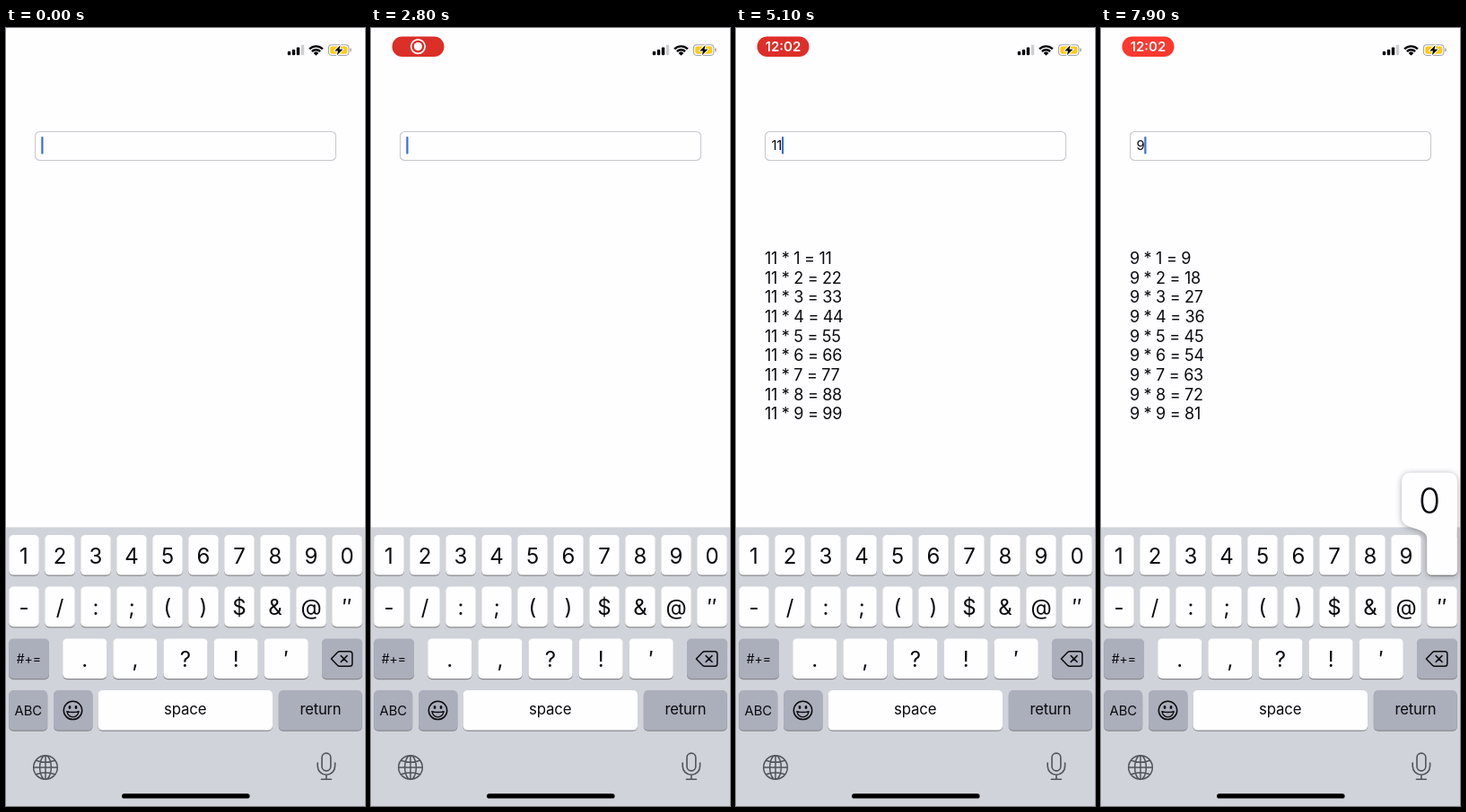
Write an HTML page with a canvas that moves like this. It is 400 by 867 pixels and loops after 8 s.

```html
<!DOCTYPE html>
<html lang="en">
<head>
<meta charset="utf-8">
<title>Times table keyboard</title>
<style>
html, body { margin: 0; width: 100%; height: 100%; overflow: hidden; background: #fefdff; }
canvas { display: block; }
</style>
</head>
<body>
<canvas id="stage" width="400" height="867"></canvas>
<script>
const ctx = document.getElementById('stage').getContext('2d');
const LOOP = 8000, STEP = 100;
const WHITE = '#fefdff', INK = '#0b0b0d', DARK_KEY = '#abaebb', GREY = '#50545b';
const ROWS = [565, 622.6, 680.4, 738];
const KEY_H = 44.6, KEY_W = 33.6;

// [start, end, key]
const presses = [
  [500, 700, '$'], [1100, 1300, '.'], [1500, 1700, ','],
  [2000, 2200, '?'], [2400, 2600, '!'],
  [3500, 3700, 'c'], [3900, 4100, 'v'],
  [4600, 4800, '1'], [4900, 5000, '1'],
  [5900, 6000, 'del'], [6500, 6600, 'del'],
  [7000, 7200, '9'], [7800, 8000, '0']
];
// [time, field value]
const edits = [[0, ''], [4700, '1'], [5000, '11'], [6000, '1'], [6600, ''], [7200, '9']];
const LETTERS_FROM = 3100, LETTERS_TO = 4300, CLOCK_FROM = 3000;

const clamp = (v, lo, hi) => Math.min(hi, Math.max(lo, v));
const rowOf = (chars, row, x, pitch, w) =>
  [...chars].map((c, i) => ({ c, x: x + i * pitch, y: ROWS[row], w }));

const numberKeys = [
  ...rowOf('1234567890', 0, 3.2, 40, KEY_W),
  ...rowOf('-/:;()$&@″', 1, 3.2, 40, KEY_W),
  ...rowOf('.,?!′', 2, 63.2, 56.1, 49.2)
];
const letterKeys = [
  ...rowOf('qwertyuiop', 0, 3.2, 40, KEY_W),
  ...rowOf('asdfghjkl', 1, 23.1, 40, KEY_W),
  ...rowOf('zxcvbnm', 2, 63.2, 40, KEY_W)
];

function text(s, x, y, size, { align = 'center', weight = 400, color = INK, gap = 0 } = {}) {
  ctx.font = `${weight} ${size}px Inter, Roboto, sans-serif`;
  ctx.textAlign = align;
  ctx.letterSpacing = gap + 'px';
  ctx.fillStyle = color;
  ctx.fillText(s, x, y);
}

function box(x, y, w, h, r, color) {
  ctx.fillStyle = color;
  ctx.beginPath();
  ctx.roundRect(x, y, w, h, r);
  ctx.fill();
}

function stroke(d, color = INK, width = 1.6) {
  ctx.strokeStyle = color;
  ctx.lineWidth = width;
  ctx.lineJoin = ctx.lineCap = 'round';
  ctx.stroke(new Path2D(d));
}

function fill(d, color = INK) {
  ctx.fillStyle = color;
  ctx.fill(new Path2D(d));
}

const circle = (x, y, rx, ry = rx) =>
  `M${x - rx} ${y}a${rx} ${ry} 0 1 0 ${2 * rx} 0a${rx} ${ry} 0 1 0 ${-2 * rx} 0Z`;

function keycap(x, y, w, color = WHITE) {
  box(x, y + 1.2, w, KEY_H, 5, '#898a8f');
  box(x, y, w, KEY_H, 5, color);
}

function statusBar(t) {
  ctx.globalAlpha = clamp(t / 300, 0, 1);
  const glow = (1 - Math.cos((t - 2850) / 2100 * 2 * Math.PI)) / 2;
  const mix = (a, b) => Math.round(a + (b - a) * glow);
  box(23.5, 9.5, 58, 22.6, 11.3, `rgb(${mix(219, 255)},${mix(47, 57)},${mix(40, 48)})`);
  if (t < CLOCK_FROM) {
    stroke(circle(52.4, 20.6, 7.8), '#fff', 1.7);
    fill(circle(52.4, 20.6, 4.6), '#fff');
  } else {
    text('12:02', 52.5, 26.2, 15, { weight: 600, color: '#fff' });
  }
  ctx.globalAlpha = 1;

  [4.2, 6.2, 8.7, 11.4].forEach((h, i) =>
    box(313.8 + i * 5, 30.2 - h, 3.4, h, 1, i < 3 ? '#000' : '#cfced1'));

  ctx.strokeStyle = ctx.fillStyle = '#000';
  ctx.lineCap = 'butt';
  ctx.lineWidth = 2.4;
  for (const r of [10.4, 6.5]) {
    ctx.beginPath();
    ctx.arc(345.5, 30.8, r, -Math.PI * .75, -Math.PI * .25);
    ctx.stroke();
  }
  ctx.beginPath();
  ctx.moveTo(345.5, 30.8);
  ctx.arc(345.5, 30.8, 4, -Math.PI * .75, -Math.PI * .25);
  ctx.fill();

  box(359, 18.3, 23.4, 12.6, 3.8, '#a5a4a8');
  box(360, 19.3, 21.4, 10.6, 3, WHITE);
  box(361.2, 20.4, 19, 8.4, 2, '#fccb14');
  box(383.2, 22.6, 1.5, 4, 1, '#a5a4a8');
  const bolt = 'M372.6 19.2L366.2 25.4H370L368.8 30.2L375.4 23.8H371.4Z';
  stroke(bolt, WHITE, 2);
  fill(bolt, '#000');
}

function field(t, value, since) {
  box(32, 115, 336, 33, 5.5, '#c9c8cb');
  box(33.1, 116.1, 333.8, 30.8, 4.5, WHITE);
  text(value, 39.5, 136.2, 14.8, { align: 'left', gap: -.2 });
  const phase = t % 1000;
  const blinkOff = t - since > 600 && phase > 220 && phase < 580;
  if (!blinkOff) box(39.3 + ctx.measureText(value).width, 121, 2.2, 19.5, 1, '#3a6fd6');
}

function table(value) {
  if (!value) return;
  for (let n = 1; n < 10; n++) {
    text(`${value} * ${n} = ${value * n}`, 32, 241.5 + n * 21.65, 18, { align: 'left', gap: -.3 });
  }
}

function popup({ c, x, y, w }) {
  const W = w + 28.4, top = y - 69.5, r = 11;
  const left = clamp(x - 14.2, 2.8, 397 - W), right = left + W;
  const bulge = y - 19, neck = y + 4, bottom = y + KEY_H;
  ctx.save();
  ctx.shadowColor = 'rgba(0,0,0,.32)';
  ctx.shadowBlur = 7;
  ctx.shadowOffsetY = 1;
  fill(`M${left + r} ${top}H${right - r}Q${right} ${top} ${right} ${top + r}V${bulge}
    C${right} ${bulge + 14} ${x + w} ${neck - 14} ${x + w} ${neck}
    V${bottom - 5}q0 5 -5 5H${x + 5}q-5 0 -5 -5V${neck}
    C${x} ${neck - 14} ${left} ${bulge + 14} ${left} ${bulge}V${top + r}
    Q${left} ${top} ${left + r} ${top}Z`, WHITE);
  ctx.restore();
  text(c, left + W / 2, y - 24.5, 39, { weight: 300 });
}

function icons(letters, deleting) {
  keycap(3.2, ROWS[2], 44.8, DARK_KEY);
  if (letters) stroke('M25.6 693.4L35.6 703.6H30.8V711.6H20.4V703.6H15.6Z', INK, 1.4);
  else text('#+=', 25.4, 708, 14);

  keycap(352, ROWS[2], 45, deleting ? WHITE : DARK_KEY);
  stroke('M362.4 703L369.4 695.8Q370.4 694.8 372 694.8H383Q385.8 694.8 385.8 697.6V708.4Q385.8 711.2 383 711.2H372Q370.4 711.2 369.4 710.2Z', INK, 1.5);
  stroke('M373.2 699.6l6.8 6.8m0-6.8l-6.8 6.8', INK, 1.5);

  keycap(3.2, ROWS[3], 43, DARK_KEY);
  text(letters ? '123' : 'ABC', 24.8, 766, letters ? 15.6 : 14.8);

  keycap(53, ROWS[3], 43.4, DARK_KEY);
  stroke(circle(74.5, 760.4, 10.2), INK, 1.5);
  fill(circle(71, 757, 1.4, 2));
  fill(circle(78, 757, 1.4, 2));
  stroke('M67.8 761.6Q74.5 763.4 81.2 761.6Q79.6 767.8 74.5 767.8Q69.4 767.8 67.8 761.6Z', INK, 1.3);

  keycap(102.6, ROWS[3], 194.4);
  text('space', 199.7, 765, 16.8, { gap: -.1 });
  keycap(303.8, ROWS[3], 93, DARK_KEY);
  text('return', 350.4, 765, 16.6, { gap: -.2 });

  stroke(circle(44, 824, 13.3) + circle(44, 824, 6.4, 13.3) +
    'M44 810.7V837.3M30.7 824H57.3M33.6 816.2Q44 820.4 54.4 816.2M33.6 831.8Q44 827.6 54.4 831.8', GREY, 1.5);
  stroke('M352 813a4.9 4.9 0 0 1 9.8 0V823a4.9 4.9 0 0 1 -9.8 0Z' +
    'M347.2 819V822.5a9.7 9.7 0 0 0 19.4 0V819M356.9 832.2V837.2M351.4 837.2H362.4', GREY, 1.6);
  box(129, 853.2, 142.6, 5.4, 2.7, '#000');
}

function keyboard(t) {
  const letters = t >= LETTERS_FROM && t < LETTERS_TO;
  const keys = letters ? letterKeys : numberKeys;
  const pressed = presses.find(([from, to]) => t >= from && t < to)?.[2];
  ctx.fillStyle = '#d1d3da';
  ctx.fillRect(0, 556.4, 400, 311);
  for (const { c, x, y, w } of keys) {
    keycap(x, y, w);
    text(c, x + w / 2, y + (letters ? 29.2 : 31.6), letters ? 25.4 : 24);
  }
  icons(letters, pressed === 'del');
  const key = keys.find(k => k.c === pressed);
  if (key) popup(key);
}

function draw(now) {
  const t = Math.floor(now % LOOP / STEP) * STEP;
  const [since, value] = edits.findLast(([at]) => at <= t);
  ctx.fillStyle = WHITE;
  ctx.fillRect(0, 0, 400, 867);
  statusBar(t);
  field(t, value, since);
  table(value);
  keyboard(t);
}

let start;
function tick(now) {
  start ??= now;
  draw(now - start);
  requestAnimationFrame(tick);
}
requestAnimationFrame(tick);
</script>
</body>
</html>
```
